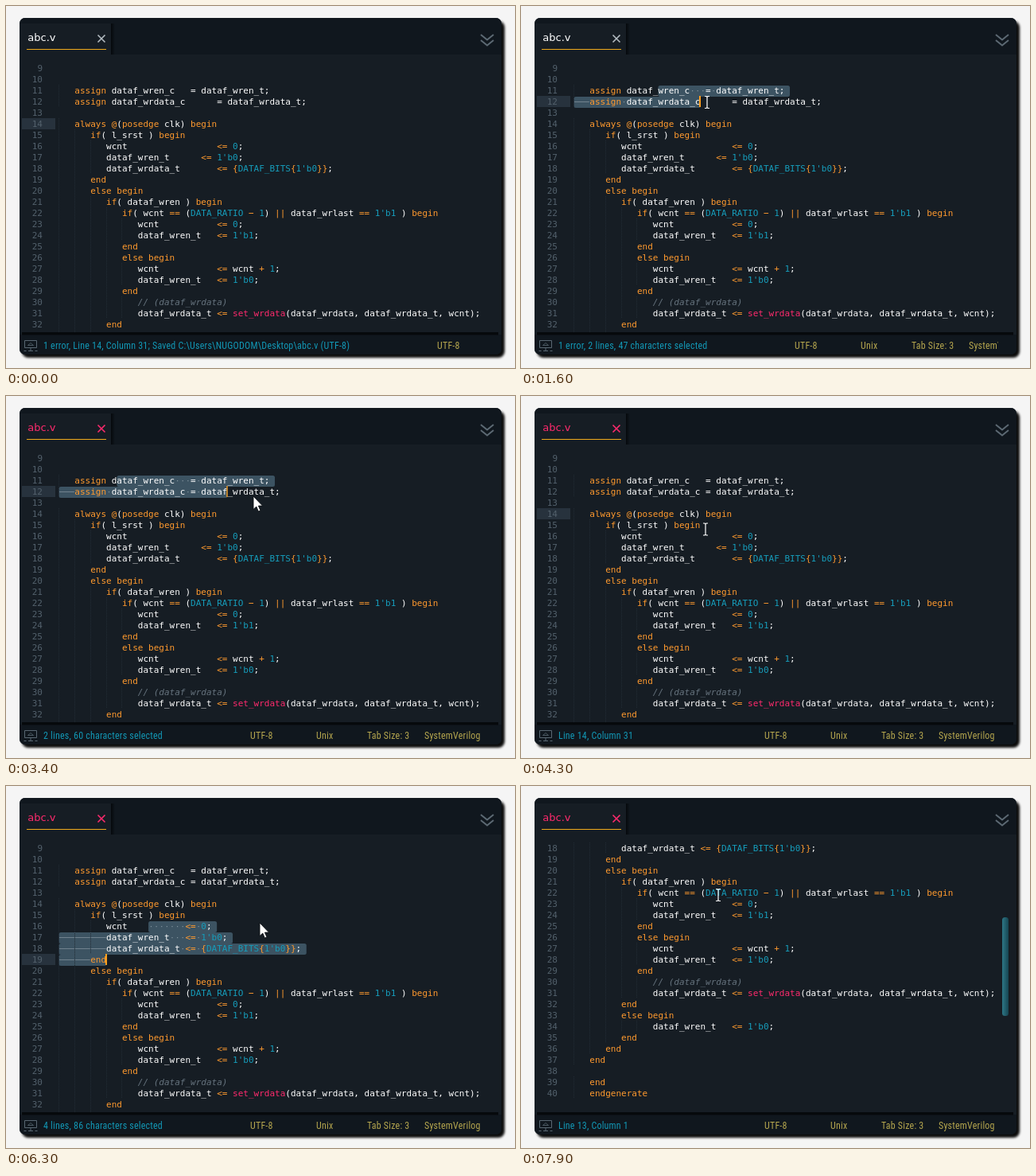
Write an HTML page that moves like this. It is 640 by 455 pixels and loops after 8 s.

```html
<!DOCTYPE html>
<html lang="en">
<head>
<meta charset="utf-8">
<title>Code alignment in an editor</title>
<style>
html, body { margin: 0; width: 640px; height: 455px; overflow: hidden; background: #f5f5f5; }
svg { display: block; }
text { white-space: pre; }
.code { font: 11px "DejaVu Sans Mono", monospace; }
.tab { font: 13px "DejaVu Sans", sans-serif; }
.status { font: 12px "Roboto Condensed", Roboto, sans-serif; font-stretch: 75%; letter-spacing: .2px; }
</style>
</head>
<body>
<svg width="640" height="455" viewBox="0 0 640 455">
  <defs>
    <filter id="blur" x="-5%" y="-5%" width="110%" height="110%"><feGaussianBlur stdDeviation="1.6"/></filter>
    <linearGradient id="edge"><stop offset="0" stop-color="#05080b"/><stop offset="1" stop-color="#10171e"/></linearGradient>
    <linearGradient id="thumb"><stop offset="0" stop-color="#2d7686"/><stop offset="1" stop-color="#174652"/></linearGradient>
    <clipPath id="page"><rect x="20" y="71" width="600" height="339"/></clipPath>
    <clipPath id="foot"><rect x="20" y="412" width="580" height="26"/></clipPath>
  </defs>
  <rect x="20" y="19" width="607" height="423" rx="8" fill="#000" opacity=".95" filter="url(#blur)"/>
  <rect x="17" y="15" width="606" height="423" rx="7" fill="#161d24"/>
  <path d="M24 15H616a7 7 0 0 1 7 7V61H132V22H17a7 7 0 0 1 7-7z" fill="#10171e"/>
  <rect x="132" y="22" width="5" height="39" fill="url(#edge)"/>
  <path d="M17 413H623V431a7 7 0 0 1-7 7H24a7 7 0 0 1-7-7z" fill="#10171e"/>
  <rect x="20" y="410" width="599" height="3.5" fill="#06090c"/>
  <text id="name" class="tab" x="27.3" y="44">abc.v</text>
  <path id="close" d="M115.5 36.5l9 9m0-9l-9 9" stroke-width="1.6"/>
  <rect x="26" y="54" width="100" height="1" fill="#f0ab1c"/>
  <path d="M597 36l8 6.5 8-6.5M597 43l8 6.5 8-6.5" fill="none" stroke="#5c6973" stroke-width="2"/>
  <g fill="none" stroke="#596772">
    <path d="M23.5 420.5h15v9h-15zM28 433.5h6M31 429.5v4M22.5 433.5h3M36.5 433.5h3"/>
    <path d="M27.5 426.5l3.5-3 3.5 3z" stroke-width=".8"/>
  </g>
  <g id="code" class="code" clip-path="url(#page)"></g>
  <rect id="bar" x="605" width="8" height="124" rx="3.5" fill="url(#thumb)"/>
  <g class="status" clip-path="url(#foot)">
    <text id="info" x="47" y="431" fill="#1298b6"></text>
    <g id="modes" fill="#b5a64e">
      <text>UTF-8</text><text x="83">Unix</text><text x="147">Tab Size: 3</text><text x="219">SystemVerilog</text>
    </g>
  </g>
  <path id="beam" d="M3-7.5h2l1 1 1-1h2M6-6.5v13M3 7.5h2l1-1 1 1h2" fill="none" stroke="#fff" stroke-width="1.2"/>
  <path id="arrow" d="M0 0V16.5l3.8-3.4 2.6 6 2.6-1.1-2.6-5.9h5.2z" fill="#fff" stroke="#0b0f13" stroke-width=".9"/>
</svg>
<script>
const LOOP = 8000, STEP = 100, LEFT = 66.5, TOP = 71, CW = 6.6226, ROW = 14, TAB = 3, FIRST = 9;
const el = id => document.getElementById(id);
const colX = c => LEFT + c * CW;
const rowY = r => TOP + (r - FIRST) * ROW;
const f = n => n.toFixed(2);
const clamp = n => Math.min(1, Math.max(0, n));

const SOURCE = `

	assign dataf_wren_c   = dataf_wren_t;
	assign dataf_wrdata_c      = dataf_wrdata_t;

	always @(posedge clk) begin
		if( l_srst ) begin
			wcnt						<= 0;
			dataf_wren_t		<= 1'b0;
			dataf_wrdata_t			<= {DATAF_BITS{1'b0}};
		end
		else begin
			if( dataf_wren ) begin
				if( wcnt == (DATA_RATIO \u2212 1) || dataf_wrlast == 1'b1 ) begin
					wcnt				<= 0;
					dataf_wren_t	<= 1'b1;
				end
				else begin
					wcnt				<= wcnt + 1;
					dataf_wren_t	<= 1'b0;
				end
					// (dataf_wrdata)
					dataf_wrdata_t <= set_wrdata(dataf_wrdata, dataf_wrdata_t, wcnt);
			end
			else begin
					dataf_wren_t	<= 1'b0;
			end
		end
	end

	end
	endgenerate`.split('\n');

function cells(line) {
  let col = 0;
  return [...line].map(ch => {
    const w = ch === '\t' ? TAB - col % TAB : 1, cell = { ch, col, w };
    col += w;
    return cell;
  });
}
const widthOf = line => cells(line).reduce((n, c) => n + c.w, 0);

const RULES = [
  [/^\/\//, '#66737e" font-style="italic'],
  [/^(assign|always|posedge|begin|end|endgenerate|if|else)$/, '#ff9a2e'],
  [/^set_wrdata$/, '#ff2a6d'],
  [/^(\d|DATA)/, '#169dbb'],
  [/^(<=|==|\|\||[\u2212+@{}])/, '#ff9a2e']
];
const TOKEN = /\/\/.*|\d+'b\d|\w+|<=|==|\|\||[^\s\w]/g;
const colour = s => (RULES.find(r => r[0].test(s)) || [0, '#fff'])[1];
const esc = s => s.replace(/</g, '&lt;');

// Pointer stops: time, x, y
const PATH = [
  [700, 294, 150], [1100, 172, 106], [1600, 228, 121], [2100, 311, 126], [3400, 311, 126],
  [3700, 298, 149], [4100, 298, 149], [4500, 154, 186], [4700, 153, 176], [4900, 241, 204],
  [5200, 319, 213], [5400, 319, 213], [6000, 319, 172], [6500, 319, 172], [6900, 344, 136],
  [7200, 347, 170], [7900, 242, 137]
];
// A click is a drag that ends where it starts
const EVENTS = [
  { drag: [1100, 2100] }, { align: 3000 }, { drag: [3700, 3700] },
  { drag: [4700, 5200] }, { align: 6300 }, { drag: [6900, 6900] }
];

function mouse(t) {
  const i = PATH.findIndex(k => k[0] > t);
  if (i < 1) return PATH[i ? PATH.length - 1 : 0].slice(1);
  const [ta, xa, ya] = PATH[i - 1], [tb, xb, yb] = PATH[i], p = (t - ta) / (tb - ta);
  return [xa + (xb - xa) * p, ya + (yb - ya) * p];
}

// Row and nearest column boundary under a point
function hit(doc, [x, y]) {
  const row = FIRST + Math.floor((y - TOP) / ROW), line = doc[row - FIRST];
  const gap = c => Math.abs(colX(c) - x);
  const col = [...cells(line).map(c => c.col), widthOf(line)].reduce((a, b) => gap(b) < gap(a) ? b : a);
  return [row, col];
}

// Line up the operators of the selected rows; the selection keeps its shifted offsets
function align(doc, s) {
  const OP = /^(.*\w)\s+(<?= .*)$/;
  const parts = doc.map((line, i) => i + FIRST >= s.r0 && i + FIRST <= s.r1 && line.match(OP));
  const stop = Math.max(...parts.map(m => m ? widthOf(m[1]) + 1 : 0));
  const out = doc.map((line, i) => {
    const m = parts[i];
    return m ? m[1] + ' '.repeat(stop - widthOf(m[1])) + m[2] : line;
  });
  const grown = i => out[i].length - doc[i].length;
  s.c0 += doc.reduce((n, line, i) => n + grown(i), 0);
  s.c1 += grown(s.r1 - FIRST);
  return out;
}

function stateAt(t) {
  const s = { doc: SOURCE, r0: 14, c0: 30, r1: 14, c1: 30, last: -1000, dirty: false, held: false };
  for (const { drag, align: at } of EVENTS) {
    if ((drag ? drag[0] : at) > t) break;
    if (drag) {
      s.last = Math.min(t, drag[1]);
      s.held = t < drag[1];
      [s.r0, s.c0] = hit(s.doc, mouse(drag[0]));
      [s.r1, s.c1] = hit(s.doc, mouse(s.last));
    } else {
      s.doc = align(s.doc, s);
      s.last = at;
      s.dirty = true;
    }
  }
  s.selected = s.r0 !== s.r1 || s.c0 !== s.c1;
  return s;
}

function blink(age) {
  const p = age % 1500;
  return p < 900 ? clamp((600 - p) / 300) : clamp((p - 1100) / 400);
}

function drawLine(line, row, from, to, whole, pick) {
  const y = rowY(row), list = cells(line), mid = y + 7.5, indent = widthOf(line.match(/^\t*/)[0]);
  let s = '';
  if (to !== null) {
    const w = (to - from + (whole ? 1 : 0)) * CW;
    s += `<rect x="${f(colX(from))}" y="${y + 1}" width="${f(w)}" height="14" rx="2.5" fill="#3c5362"/>`;
  }
  for (const c of list) {
    const x = colX(c.col);
    if (c.col < indent)
      s += `<path d="M${Math.floor(x) + .5} ${y}v14" stroke="#222c35" stroke-dasharray="1 1"/>`;
    if (!pick(c)) continue;
    if (c.ch === '\t') s += `<path d="M${f(x + .5)} ${mid}H${f(x + c.w * CW - .5)}" stroke="#71828e"/>`;
    if (c.ch === ' ') s += `<rect x="${f(x + 2.8)}" y="${y + 7}" width="1.2" height="1.2" fill="#8495a0"/>`;
  }
  for (const m of line.matchAll(TOKEN))
    s += `<text x="${f(colX(list[m.index].col))}" y="${y + 11}" fill="${colour(m[0])}">${esc(m[0])}</text>`;
  return s + `<text x="46" y="${y + 11}" text-anchor="end" fill="#53616c">${row}</text>`;
}

function render(t) {
  const { doc, r0, c0, r1, c1, last, dirty, held, selected } = stateAt(t);
  const scroll = 126 * (1 - (1 - clamp((t - 7000) / 900)) ** 1.34);
  let count = 0;
  let s = `<rect x="20" y="${rowY(r1)}" width="42" height="14" fill="#27323d"/>`;
  doc.forEach((line, i) => {
    const row = i + FIRST, inside = selected && row >= r0 && row <= r1, whole = row < r1;
    const from = row === r0 ? c0 : 0, to = whole ? widthOf(line) : c1;
    const pick = c => inside && c.col >= from && c.col < to;
    if (inside) count += cells(line).filter(pick).length + (whole ? 1 : 0);
    s += drawLine(line, row, from, inside ? to : null, whole, pick);
  });
  s += `<rect x="${Math.floor(colX(c1)) - 1}" y="${rowY(r1)}" width="2" height="14" fill="#ffa01e" opacity="${f(blink(t - last))}"/>`;
  el('code').innerHTML = `<g transform="translate(0 ${Math.round(-scroll)})">${s}</g>`;

  el('name').setAttribute('fill', dirty ? '#ff2a6d' : '#fff');
  el('close').setAttribute('stroke', dirty ? '#ff2a6d' : '#b4bcc2');

  const info = el('info'), span = r1 > r0 ? r1 - r0 + 1 + ' lines, ' : '';
  info.textContent = (dirty ? '' : '1 error, ')
    + (selected ? `${span}${count} characters selected` : `Line ${r1}, Column ${c1 + 1}`)
    + (t < 300 ? '; Saved C:\\Users\\NUGODOM\\Desktop\\abc.v (UTF-8)' : '');
  const right = Math.max(306, 157 + info.getComputedTextLength());
  el('modes').setAttribute('transform', `translate(${Math.round(right)} 431)`);

  el('bar').setAttribute('y', f(116 + scroll * .389));
  el('bar').setAttribute('visibility', scroll ? 'visible' : 'hidden');

  const [x, y] = mouse(t), shape = selected && !held ? 'arrow' : 'beam';
  for (const id of ['beam', 'arrow']) {
    el(id).setAttribute('visibility', t >= 700 && id === shape ? 'visible' : 'hidden');
    el(id).setAttribute('transform', `translate(${f(x)} ${f(y)})`);
  }
}

let shown = -1;
function tick() {
  const t = Math.floor(performance.now() % LOOP / STEP) * STEP;
  if (t !== shown) render(shown = t);
  requestAnimationFrame(tick);
}
tick();
</script>
</body>
</html>
```
